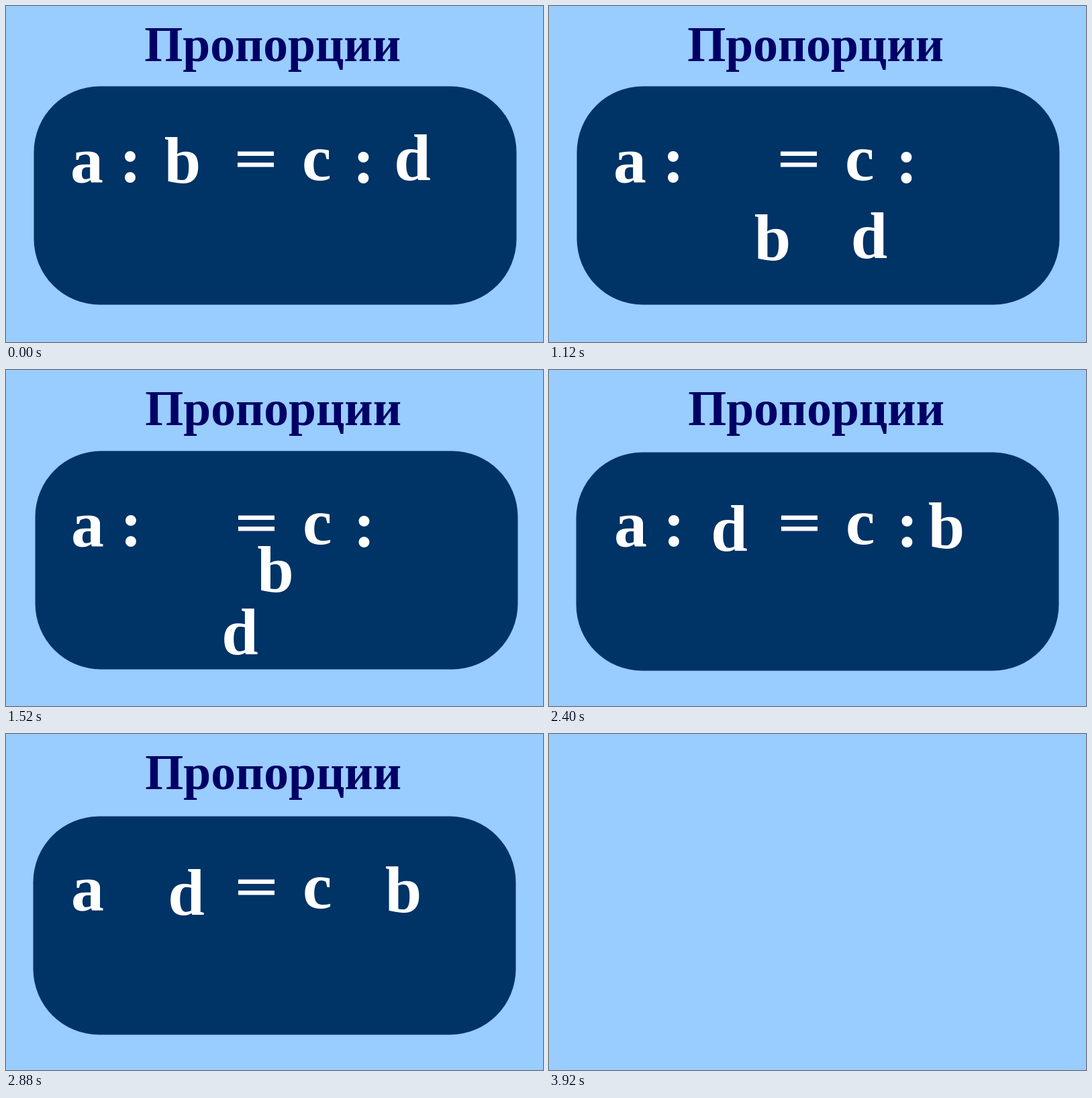
These frames come from a looping animation (800 by 500 pixels, 4320 ms). An HTML page:

```html
<!DOCTYPE html>
<html lang="ru">
<head>
<meta charset="utf-8">
<title>Пропорции</title>
<style>
  html, body { margin: 0; width: 100%; height: 100%; overflow: hidden; background: #9cf; }
  svg { display: block; width: 800px; height: 500px; fill: #fff; }
  text { font-family: "Liberation Serif", "Times New Roman", serif; font-weight: bold; }
  .title { fill: #006; }
  .panel { fill: #036; }
  .scene { visibility: hidden; }
  .scene.on { visibility: visible; }
</style>
</head>
<body>
<svg id="stage" viewBox="0 0 800 500"></svg>
<script>
const LOOP = 4320;
const LETTER_SIZE = 98;
const PETAL = 'M0 0C-5.5 -13.5 -3.5 -15.5 0 -15.5S5.5 -13.5 0 0Z';
const stage = document.getElementById('stage');
const pen = document.createElement('canvas').getContext('2d');
pen.font = 'bold 1000px "Liberation Serif", "Times New Roman", serif';

function add(parent, tag, attrs, content = '') {
  const node = document.createElementNS('http://www.w3.org/2000/svg', tag);
  for (const key in attrs) node.setAttribute(key, attrs[key]);
  node.textContent = content;
  return parent.appendChild(node);
}

// Places text so that the middle of its visible ink is at (cx, cy).
function write(parent, content, cx, cy, size = LETTER_SIZE, cls = '') {
  const m = pen.measureText(content);
  const half = size / 2000;
  add(parent, 'text', {
    x: cx + (m.actualBoundingBoxLeft - m.actualBoundingBoxRight) * half,
    y: cy + (m.actualBoundingBoxAscent - m.actualBoundingBoxDescent) * half,
    'font-size': size,
    class: cls
  }, content);
}

function drawEquals(parent, x) {
  for (const y of [216.5, 233]) add(parent, 'rect', { x, y, width: 54, height: 6.5 });
}

function drawStar(parent, x, y) {
  for (let angle = 0; angle < 360; angle += 72) {
    add(parent, 'path', { d: PETAL, transform: `translate(${x} ${y}) rotate(${angle})` });
  }
}

// Each scene: start time, panel corner, text shift, operator, centres of b and d.
const scenes = [
  { at: 0,    panel: [41.5, 119.5], shift: 0, op: ':', b: [261, 229.5],   d: [606.5, 225.5] },
  { at: 720,  panel: [41.5, 119.5], shift: 0, op: ':', b: [262, 344],     d: [606.5, 340.5] },
  { at: 1120, panel: [41.5, 119.5], shift: 0, op: ':', b: [331, 344.5],   d: [478, 341] },
  { at: 1520, panel: [43.5, 120.5], shift: 1, op: ':', b: [399.5, 296.5], d: [349.5, 389.5] },
  { at: 1920, panel: [40.5, 123.5], shift: 1, op: ':', b: [590, 346],     d: [269.5, 350] },
  { at: 2400, panel: [40.5, 122.5], shift: 1, op: ':', b: [590, 231],     d: [269.5, 235] },
  { at: 2880, panel: [40.5, 122.5], shift: 1, op: '',  b: [590, 231],     d: [269.5, 235] },
  { at: 3280, panel: [40.5, 122.5], shift: 1, op: '*', b: [590, 231],     d: [269.5, 235] },
  { at: 3920 }
];

function build({ panel, shift, op, b, d }) {
  const g = add(stage, 'g', { class: 'scene' });
  if (!panel) return g;
  write(g, 'Пропорции', 397.2 + shift, 65.6, 73.5, 'title');
  add(g, 'rect', { class: 'panel', x: panel[0], y: panel[1], width: 719, height: 325, rx: 98 });
  write(g, 'a', 122 + shift, 239.5);
  drawEquals(g, 345 + shift);
  write(g, 'c', 463.3 + shift, 236);
  if (op === ':') {
    write(g, ':', 185 + shift, 239.5);
    write(g, ':', 532.5 + shift, 240.5);
  } else if (op === '*') {
    drawStar(g, 186 + shift, 228.8);
    drawStar(g, 523 + shift, 227.5);
  }
  write(g, 'b', ...b);
  write(g, 'd', ...d);
  return g;
}

const groups = scenes.map(build);
const start = performance.now();

function draw() {
  const time = (performance.now() - start) % LOOP;
  const current = scenes.findLastIndex(scene => scene.at <= time);
  groups.forEach((g, i) => g.classList.toggle('on', i === current));
  requestAnimationFrame(draw);
}
draw();
</script>
</body>
</html>
```
